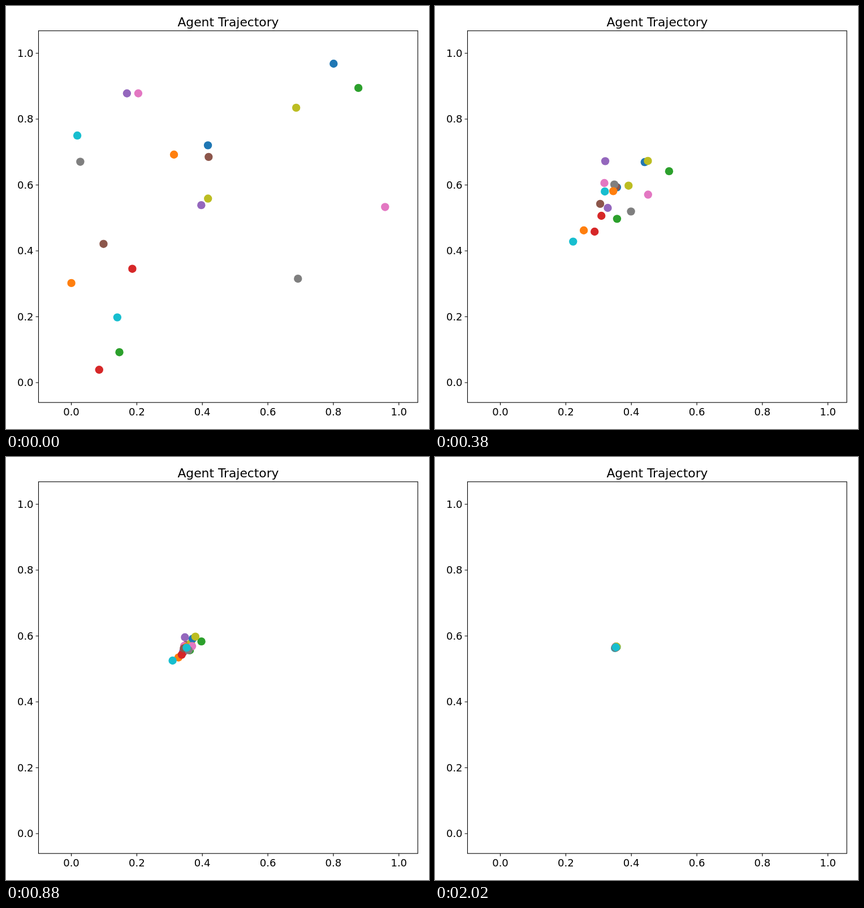
Write an HTML page that moves like this. It is 748 by 748 pixels and loops after 2.04 s.

```html
<!DOCTYPE html>
<html lang="en">
<head>
<meta charset="utf-8">
<title>Agent Trajectory</title>
<style>
  html, body { margin: 0; width: 100%; height: 100%; overflow: hidden; background: #fff; }
  svg { display: block; width: 100vw; height: 100vh; }
  text { font: 18.05px "DejaVu Sans", sans-serif; fill: #000; }
  .title { font-size: 21.8px; }
  .axes { fill: none; stroke: #000; stroke-width: 1.1; }
</style>
</head>
<body>
<svg id="stage" viewBox="0 0 748 748"></svg>
<script>
const LOOP = 2040, STEP = 20;
const FAST = 0.00578, SLOW = 0.0024; // decay rates per ms
const COLORS = ['#1f77b4', '#ff7f0e', '#2ca02c', '#d62728', '#9467bd',
                '#8c564b', '#e377c2', '#7f7f7f', '#bcbd22', '#17becf'];
// Slowly fading part of each agent's offset from the meeting point, in px.
const DRIFT = [
  [-7, -20], [-117, 149], [53, 32], [-51, 70], [-59, 65],
  [-14, -31], [-37, -11], [63, -48], [63, -66], [-213, 194],
  [76, -118], [-7, -3], [208, -79], [-70, 98], [-24, -144],
  [-39, 14], [62, -17], [17, 37], [121, -155], [7, 12]
];

const stage = document.getElementById('stage');
const toX = v => 115.5 + 579.25 * v;
const toY = v => 666 - 582.5 * v;

function add(tag, attrs, label = '') {
  const node = document.createElementNS('http://www.w3.org/2000/svg', tag);
  for (const key in attrs) node.setAttribute(key, attrs[key]);
  node.textContent = label;
  return stage.appendChild(node);
}

// Mersenne Twister, first block only; every second word gives one number.
function randomSource(seed) {
  const state = [seed];
  for (let i = 1; i < 624; i++) {
    const prev = state[i - 1];
    state.push((Math.imul(1812433253, prev ^ (prev >>> 30)) + i) >>> 0);
  }
  let index = 0;
  return () => {
    const mix = (state[index] & 0x80000000) | (state[index + 1] & 0x7fffffff);
    let y = state[index + 397] ^ (mix >>> 1) ^ (mix & 1 ? 0x9908b0df : 0);
    index += 2;
    y ^= y >>> 11;
    y ^= (y << 7) & 0x9d2c5680;
    y ^= (y << 15) & 0xefc60000;
    y ^= y >>> 18;
    return (y >>> 0) / 2 ** 32;
  };
}

function drawAxes() {
  add('rect', { class: 'axes', x: 57.5, y: 43.8, width: 670.7, height: 657.3 });
  add('text', { class: 'title', x: 393, y: 36, 'text-anchor': 'middle' }, 'Agent Trajectory');
  for (let i = 0; i < 6; i++) {
    const x = toX(i / 5), y = toY(i / 5), label = (i / 5).toFixed(1);
    add('path', { class: 'axes', d: `M${x} 701.1v4.9M57.5 ${y}h-4.9` });
    add('text', { x, y: 724.3, 'text-anchor': 'middle' }, label);
    add('text', { x: 48.6, y: y + 6.3, 'text-anchor': 'end' }, label);
  }
}

drawAxes();
const random = randomSource(1);
const agents = DRIFT.map((drift, i) => ({
  drift,
  start: [toX(random()), toY(random())],
  node: add('circle', { r: 7.2, fill: COLORS[i % COLORS.length] })
}));

// The agents meet at the mean of their starting places.
const center = [0, 1].map(axis =>
  agents.reduce((sum, agent) => sum + agent.start[axis], 0) / agents.length);

function render(t) {
  const fast = Math.exp(-FAST * t), slow = Math.exp(-SLOW * t);
  for (const { node, start, drift } of agents) {
    ['cx', 'cy'].forEach((name, axis) => {
      const rest = start[axis] - center[axis] - drift[axis];
      node.setAttribute(name, center[axis] + drift[axis] * slow + rest * fast);
    });
  }
}

const begin = performance.now();
function tick() {
  const elapsed = (performance.now() - begin) % LOOP;
  render(Math.floor(elapsed / STEP) * STEP);
  requestAnimationFrame(tick);
}
tick();
</script>
</body>
</html>
```
